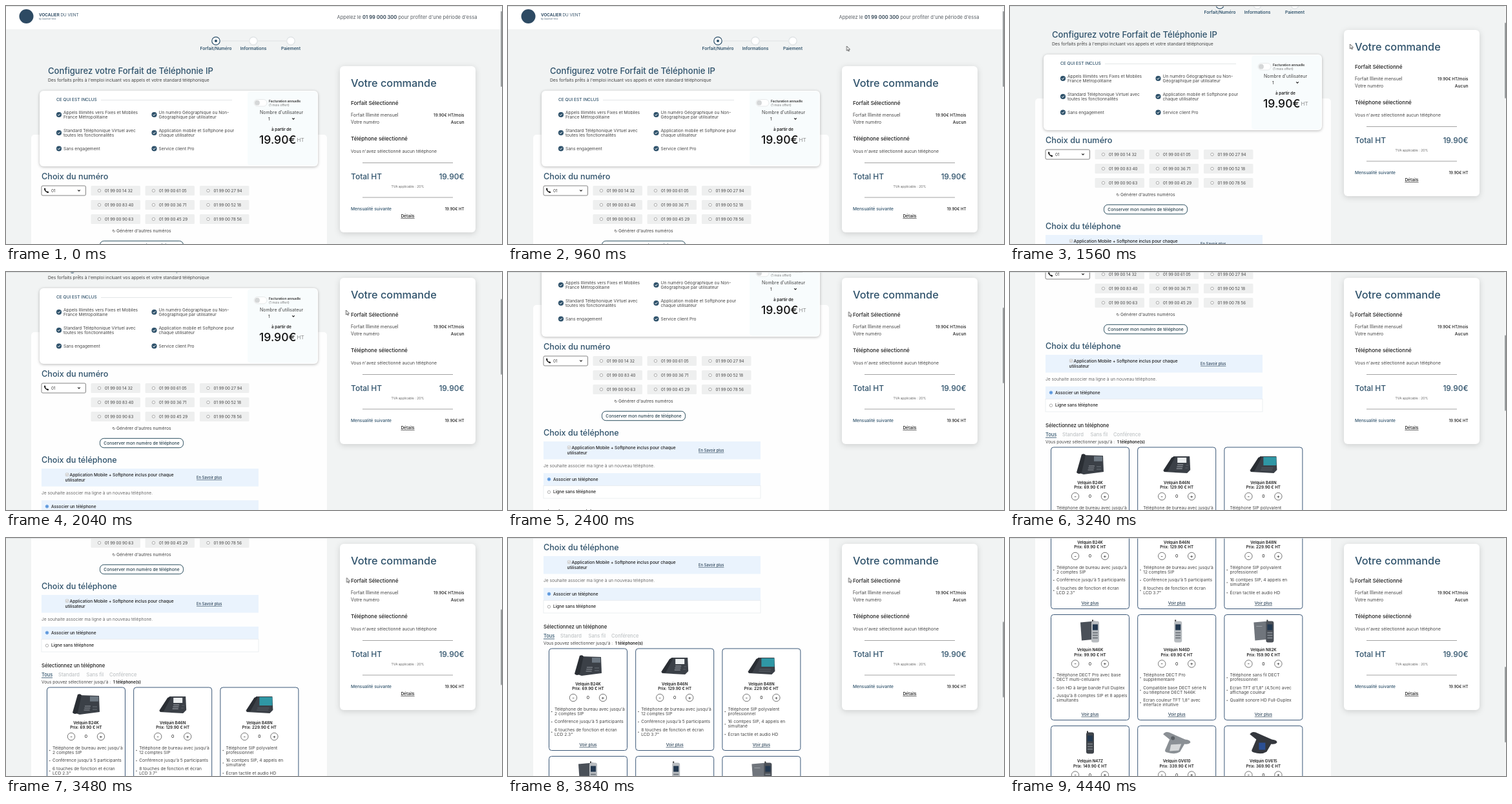
An HTML page that plays this animation: 768x368 px, repeating every 4.56 s.

```html
<!DOCTYPE html>
<html lang="fr">
<head>
<meta charset="utf-8">
<title>Configurateur</title>
<style>
  html, body { margin: 0; width: 100%; height: 100%; overflow: hidden; background: #f1f3f3; }
  svg { display: block; width: 768px; height: 368px; font-family: Inter, "Open Sans", sans-serif; }
  .card { fill: #fff; filter: drop-shadow(0 1px 2px rgba(0, 0, 0, .28)); }
  .order { fill: #fff; filter: drop-shadow(0 2px 5px rgba(0, 0, 0, .15)); }
  .u { text-decoration: underline; }
</style>
</head>
<body>
<svg id="stage" viewBox="0 0 768 368"></svg>
<script>
const BLUE = '#2f526b', INK = '#1c1c1c', BODY = '#454545', MUTED = '#bfc3c5';

// Small drawing helpers; text is placed by the middle of its capitals.
const text = (x, y, size, str, { fill = BODY, w = 400, at = 'start', cls = '' } = {}) =>
  `<text x="${x}" y="${y + size * .36}" font-size="${size}" fill="${fill}" font-weight="${w}" text-anchor="${at}" class="${cls}">${str}</text>`;
const lines = (x, y, size, rows, opt) => rows.map((s, i) => text(x, y + i * 7, size, s, opt)).join('');
const rect = (x, y, w, h, fill, more = '') =>
  `<rect x="${x}" y="${y}" width="${w}" height="${h}" fill="${fill}" ${more}/>`;
const circle = (x, y, r, fill, stroke = 'none', sw = 1) =>
  `<circle cx="${x}" cy="${y}" r="${r}" fill="${fill}" stroke="${stroke}" stroke-width="${sw}"/>`;
const path = (d, fill, stroke = 'none', sw = 1) =>
  `<path d="${d}" fill="${fill}" stroke="${stroke}" stroke-width="${sw}"/>`;
const chevron = (x, y) => path(`M${x - 1.8} ${y - .9}l1.8 1.8l1.8 -1.8`, 'none', '#222', 1.1);
const radio = (x, y, on) => on
  ? circle(x, y, 2.2, '#fff', '#1c6fd0', .8) + circle(x, y, 1.3, '#1c6fd0')
  : circle(x, y, 2.2, '#fff', '#777', .6);

function header() {
  const steps = [['Forfait/Numéro', 325], ['Informations', 383], ['Paiement', 441]];
  return rect(0, 0, 768, 36, '#fff') +
    circle(31.5, 16, 11, '#2d4a63') +
    text(51, 14, 6.3, '<tspan font-weight="700">VOCALIER</tspan> DU VENT', { fill: '#37536a' }) +
    text(51, 19.6, 3.5, 'by Quorvel Voix', { fill: '#5d7385', w: 500 }) +
    text(512.5, 17.5, 7.55, `Appelez le <tspan font-weight="600" fill="#2b3f4f">01 99 000 300</tspan> pour profiter d'une période d'essa`, { fill: '#5a6066' }) +
    path('M332 54H376M390 54H434', 'none', '#dfe3e4') +
    steps.map(([name, x], i) =>
      circle(x, 54, 6.2, '#fff', i ? '#dde1e3' : BLUE, 1.2) + (i ? '' : circle(x, 54, 2.1, BLUE)) +
      text(x, 66, 6.65, name, { fill: BLUE, w: 600, at: 'middle' })).join('');
}

function plan() {
  const items = [
    [82, 168, ['Appels Illimités vers Fixes et Mobiles', 'France Métropolitaine']],
    [82, 196, ['Standard Téléphonique Virtuel avec', 'toutes les fonctionnalités']],
    [82, 220.5, ['Sans engagement']],
    [229.5, 168, ['Un numéro Géographique ou Non-', 'Géographique par utilisateur']],
    [229.5, 196, ['Application mobile et Softphone pour', 'chaque utilisateur']],
    [229.5, 220.5, ['Service client Pro']]
  ];
  return text(65, 100, 13.1, 'Configurez votre Forfait de Téléphonie IP', { fill: BLUE, w: 500 }) +
    text(65, 115, 6.74, "Des forfaits prêts à l'emploi incluant vos appels et votre standard téléphonique") +
    rect(39, 199, 458, 1200, '#fefefe', 'rx="5"') +
    rect(52, 131, 431, 117, '#fff', 'rx="6" class="card"') +
    rect(374, 132, 108, 115, '#f8fcfd', 'rx="5"') +
    text(78, 145, 6.6, 'CE QUI EST INCLUS', { fill: BLUE, w: 500 }) +
    path('M147 145.5H350', 'none', '#e3e6e7') +
    items.map(([x, y, rows]) =>
      circle(x, y, 4.1, BLUE) + path(`M${x - 1.9} ${y}l1.4 1.5l2.5 -2.8`, 'none', '#fff', 1) +
      lines(x + 7, y - (rows.length - 1) * 3.5, 6.65, rows)).join('') +
    rect(384, 144.5, 20, 10.5, '#fff', 'rx="5.2" stroke="#e1e4e5" stroke-width=".8"') +
    circle(389, 149.7, 3.9, '#d5d7d8') +
    text(407, 147.5, 5, 'Facturation annuelle', { fill: '#333', w: 600 }) +
    text(407, 153.3, 4.9, '(1 mois offert)', { fill: '#777' }) +
    text(426.5, 164.5, 7, "Nombre d'utilisateur", { at: 'middle' }) +
    text(406, 174.5, 6.6, '1', { fill: INK }) + chevron(445, 174.3) +
    text(426.5, 191, 6.25, 'à partir de', { fill: INK, w: 600, at: 'middle' }) +
    text(392, 206.7, 17.6, '19.90€', { fill: '#111', w: 500 }) +
    text(450.5, 206.7, 8, 'HT', { fill: '#888' });
}

function numbers() {
  const ends = ['14 32', '61 05', '27 94', '83 40', '36 71', '52 18', '90 63', '45 29', '78 56'];
  const cells = ends.map((end, i) => {
    const x = [131.5, 215.5, 300][i % 3], y = 278 + Math.floor(i / 3) * 22;
    return rect(x, y, 76.5, 15, '#eeefef', 'rx="1.5"') + radio(x + 13, y + 7.5) +
      text(x + 21.5, y + 7.5, 6.2, '01 99 00 ' + end);
  }).join('');
  return text(55, 263, 12.7, 'Choix du numéro', { fill: BLUE, w: 500 }) +
    rect(55, 278, 68.5, 15, '#fff', 'rx="2" stroke="#777" stroke-width=".9"') +
    path('M59.6 282.4q.8 4.4 5.6 6.2', 'none', '#111', 1.5) +
    path('M59 281.8l1.6 -.4l1 2.2l-1.2 1zM63 287.2l1.2 -1l2 1.2l-.6 1.8z', '#111') +
    text(70, 285.5, 6.4, '01') + chevron(113, 285.3) + cells +
    `<text x="164.5" y="350" font-size="6" font-family="DejaVu Sans, sans-serif" fill="#333">↻</text>` +
    text(171, 347.5, 6.85, "Générer d'autres numéros") +
    rect(145.5, 363.3, 129, 14.4, '#fff', 'rx="6" stroke="#2c4f5f"') +
    text(210, 370.5, 6.6, 'Conserver mon numéro de téléphone', { fill: '#243f4c', w: 500, at: 'middle' });
}

function choice() {
  const opt = { fill: INK, w: 500 };
  return text(55, 396, 12.6, 'Choix du téléphone', { fill: BLUE, w: 500 }) +
    rect(55, 410, 336, 27.5, '#eaf3fd') +
    rect(92.3, 417, 4.6, 4.6, '#f2f2f2', 'rx=".8" stroke="#bbb" stroke-width=".7"') +
    path('M93.3 419.2l1 1.1l1.8 -2', 'none', '#999', .7) +
    text(98.5, 419.7, 6.6, 'Application Mobile + Softphone inclus pour chaque', opt) +
    text(91.5, 427.2, 6.6, 'utilisateur', opt) +
    text(295, 424, 5.85, 'En Savoir plus', { fill: '#2b4358', w: 500, cls: 'u' }) +
    text(55, 448, 6.65, 'Je souhaite associer ma ligne à un nouveau téléphone.', { fill: '#6b6b6b' }) +
    rect(55, 459, 336, 19.5, '#eaf3fd') +
    rect(55, 478.5, 336, 19.5, '#fff', 'stroke="#e6eaee" stroke-width=".8"') +
    radio(63.5, 468.5, true) + text(70, 468.3, 6.5, 'Associer un téléphone', opt) +
    radio(63.5, 488.3) + text(70, 488, 6.5, 'Ligne sans téléphone', opt) +
    text(55, 519.5, 7.75, 'Sélectionnez un téléphone', opt) +
    text(55, 533, 7.4, 'Tous', { fill: BLUE, w: 500 }) + path('M55 538H72', 'none', BLUE, .9) +
    [['Standard', 81], ['Sans fil', 124.5], ['Conférence', 160]].map(([s, x]) =>
      text(x, 533, 7.6, s, { fill: MUTED, w: 500 })).join('') +
    text(55, 544.8, 6.5, "Vous pouvez sélectionner jusqu'à :") +
    text(166, 544.8, 6.3, '1 téléphone(s)', { fill: INK, w: 600 });
}

// Devices, drawn around (0, 0).
const dark = '#3b4047', mid = '#5b6169';
const keys = (x, y, color) => [0, 1, 2].map(i =>
  path(`M${x - i * .7} ${y + i * 3}h9`, 'none', color, 1.2) ).join('');
const desk = (screen, w) =>
  path('M-11 -14L20 -13L21 12L-10 16L-19 13Z', dark) +
  path('M-13 -15q4 -2 6 1L-13 13q-4 4 -8 0Z', '#2a2e34') +
  rect(20 - w, -12, w - 1, w * .55, screen) + keys(-2, 3, '#868c93') + path('M10 4h7M10 8h7', 'none', mid, 1.3);
const wide = screen =>
  path('M-5 -12L20 -12L21 9L16 14L-20 12L-19 8Z', dark) +
  path('M-8 -10q4 -2 5 0L-14 11q-4 2 -7 -1Z', '#2a2e34') + screen;
const handset = (x, body, face) =>
  path(`M${x - 5} -15v-3h2v3`, '#333') + rect(x - 6, -16, 12, 33, body, 'rx="3"') +
  rect(x - 4, -11, 8, 9, '#23384f') + [2, 6, 10].map(y => path(`M${x - 4} ${y}h8`, 'none', face, 1.6)).join('');
const base = color => path('M-15 -14L8 -16L9 12L-13 14Z', color);
const hub = (body, top) =>
  path('M-21 -13q3 -5 9 -3L13 -5q9 1 8 5q-3 3 -9 2L5 14q-8 5 -20 1Q-20 14 -17 9L-11 -5Z', body) + top;
const devices = [
  desk('#6d7882', 14),
  wide(rect(1, -10, 14, 8, '#eceff0') + keys(1, 1, '#9aa0a6') + path('M14 2h4M13 6h4', 'none', mid)),
  wide(rect(0, -11, 20, 13, '#2f97a5') + path('M-3 6h18M-4 9h18', 'none', mid)),
  base('#4a5058') + handset(8, '#b8bcc0', '#676d74'),
  handset(2, '#b8bcc0', '#676d74'),
  base('#70757c') + handset(10, '#4c5158', '#8a9097') + path('M-11 -8h9', 'none', '#9aa0a6'),
  handset(0, '#3f444a', '#7a8087'),
  hub('#8b9095', path('M-9 3l16 -1l-4 10l-14 1z', '#d7d9da') + circle(-6, -7, 3, '#5c6166')),
  hub('#34373d', rect(-7, 0, 10, 11, '#2b4f94'))
];

const maker = 'Velquin ';
const phones = [
  ['B24K', '69.90', ["Téléphone de bureau avec jusqu'à|2 comptes SIP", "Conférence jusqu'à 5 participants", '6 touches de fonction et écran|LCD 2.3"']],
  ['B46N', '129.90', ["Téléphone de bureau avec jusqu'à|12 comptes SIP", "Conférence jusqu'à 5 participants", '8 touches de fonction et écran|LCD 3.7"']],
  ['B48N', '229.90', ['Téléphone SIP polyvalent|professionnel', '16 comtpes SIP, 4 appels en|simultané', 'Écran tactile et audio HD']],
  ['N46K', '99.90', ['Téléphone DECT Pro avec base|DECT multi-cellulaire', 'Son HD à large bande Full Duplex', "Jusqu'à 8 comptes SIP et 8 appels|simultanés"]],
  ['N46D', '69.90', ['Téléphone DECT Pro|supplémentaire', 'Compatible base DECT série N|ou téléphone DECT N46K', 'Ecran couleur TFT 1,8" avec|interface intuitive']],
  ['N82K', '159.90', ['Téléphone sans fil DECT|professionnel', `Ecran TFT d'1,8" (4,5cm) avec|affichage couleur`, 'Qualité sonore HD Full-Duplex']],
  ['N47Z', '149.90', []],
  ['GV610', '339.90', []],
  ['GV615', '369.90', []]
];

function phoneCard([model, price, specs], i) {
  const row = Math.floor(i / 3), x = 63.5 + (i % 3) * 134.2, cx = x + 60.5;
  const top = [553, 719.5, 891.5][row], h = row ? 163 : 157.5;
  const bold = { fill: INK, w: 600, at: 'middle' };
  let y = top + 93.5;
  const list = specs.map(spec => {
    const rows = spec.split('|'), extra = (rows.length - 1) * 7;
    const out = circle(x + 4.3, y + extra / 2 + .5, .7, '#333') + lines(x + 8.5, y, 6.7, rows);
    y += extra + 12.4;
    return out;
  }).join('');
  const knob = (dx, sign) => circle(cx + dx, top + 76, 5.7, '#fff', '#555', .8) +
    text(cx + dx, top + 75.8, 8, sign, { fill: INK, at: 'middle' });
  return rect(x, top, 121, h, '#fff', 'rx="4" stroke="#3b5878"') +
    `<g transform="translate(${cx} ${top + 26})">${devices[i]}</g>` +
    text(cx, top + 54.5, 6.1, maker + model, bold) +
    text(cx, top + 62, 6.25, `Prix: ${price} € HT`, bold) +
    knob(-23, '-') + text(cx, top + 76, 6.8, '0', { fill: INK, at: 'middle' }) + knob(23, '+') + list +
    text(cx, top + h - 8.5, 6.5, 'Voir plus', { fill: '#2b4358', w: 500, at: 'middle', cls: 'u' });
}

function order() {
  const head = { fill: INK, w: 500 }, right = { fill: INK, w: 500, at: 'end' };
  const big = { fill: BLUE, w: 500 };
  return rect(517, 93, 210, 257, '#fff', 'rx="6" class="order"') +
    text(534, 119.3, 16.3, 'Votre commande', big) +
    text(534, 150, 8.2, 'Forfait Sélectionné', head) +
    text(534, 168.7, 6.95, 'Forfait Illimité mensuel') + text(709.5, 168.7, 6.3, '19.90€ HT/mois', right) +
    text(534, 179.6, 6.9, 'Votre numéro') + text(709.5, 179.6, 6.7, 'Aucun', right) +
    text(534, 205.5, 8.15, 'Téléphone sélectionné', head) +
    text(534, 224.2, 6.78, "Vous n'avez sélectionné aucun téléphone") +
    path('M552 242.5H692M552 296H692', 'none', '#999', .9) +
    text(534, 264, 12, 'Total HT', big) + text(709.5, 264, 12, '19.90€', { ...big, at: 'end' }) +
    text(622, 279.2, 5, 'TVA applicable : 20%', { fill: '#666', at: 'middle' }) +
    text(534, 314, 6.6, 'Mensualité suivante', big) + text(709.5, 314, 6.1, '19.90€ HT', right) +
    text(622, 324.6, 6.5, 'Détails', { fill: INK, w: 500, at: 'middle', cls: 'u' });
}

document.getElementById('stage').innerHTML =
  rect(0, 0, 768, 368, '#f1f3f3') +
  `<g id="page">${header()}${plan()}${numbers()}${choice()}${phones.map(phoneCard).join('')}</g>` +
  `<g id="order">${order()}</g>` +
  path('M0 .5H768', 'none', '#d3d7d9', .8) +
  rect(765.5, 0, 2.5, 368, '#f4f5f5') +
  `<g id="thumb">${rect(766, 8, 2, 117, '#9a9d9f', 'rx="1"')}</g>` +
  `<g id="pointer">${path('M0 0V7.2L1.7 5.7L2.8 8L3.9 7.5L2.8 5.3L5 5.1Z', '#fff', '#222', .7)}</g>`;

// Scroll position and pointer for each 120 ms tick; the scroll starts after tick 8.
const TICK = 120, TICKS = 38, START = 8;
const scrollSteps = [0, 28, 34, 38, 44, 56, 68, 80, 94, 106, 120, 134, 148, 162, 178, 192,
  214, 237, 260, 282, 302, 322, 342, 362, 382, 425, 470, 515, 560, 601];
const scrollAt = k => scrollSteps[Math.max(0, k - START)];
const pointerAt = k => k < 12 ? [524.5, 62] : k < 20 ? [526.5, 59] : [527.5, 61.5];

function play(id, frame) {
  const frames = Array.from({ length: TICKS }, (_, k) =>
    ({ ...frame(k), offset: Math.max(0, k / TICKS - 1e-4), easing: 'step-end' }));
  frames.push({ ...frame(TICKS - 1), offset: 1 });
  document.getElementById(id).animate(frames, { duration: TICK * TICKS, iterations: Infinity });
}
const move = (x, y) => ({ transform: `translate(${x}px, ${y}px)` });

play('page', k => move(0, -scrollAt(k)));
play('order', k => move(0, -Math.min(84, scrollAt(k))));
play('thumb', k => move(0, scrollAt(k) * .318));
play('pointer', k => ({ ...move(...pointerAt(k)), opacity: k < START ? 0 : 1 }));
</script>
</body>
</html>
```
